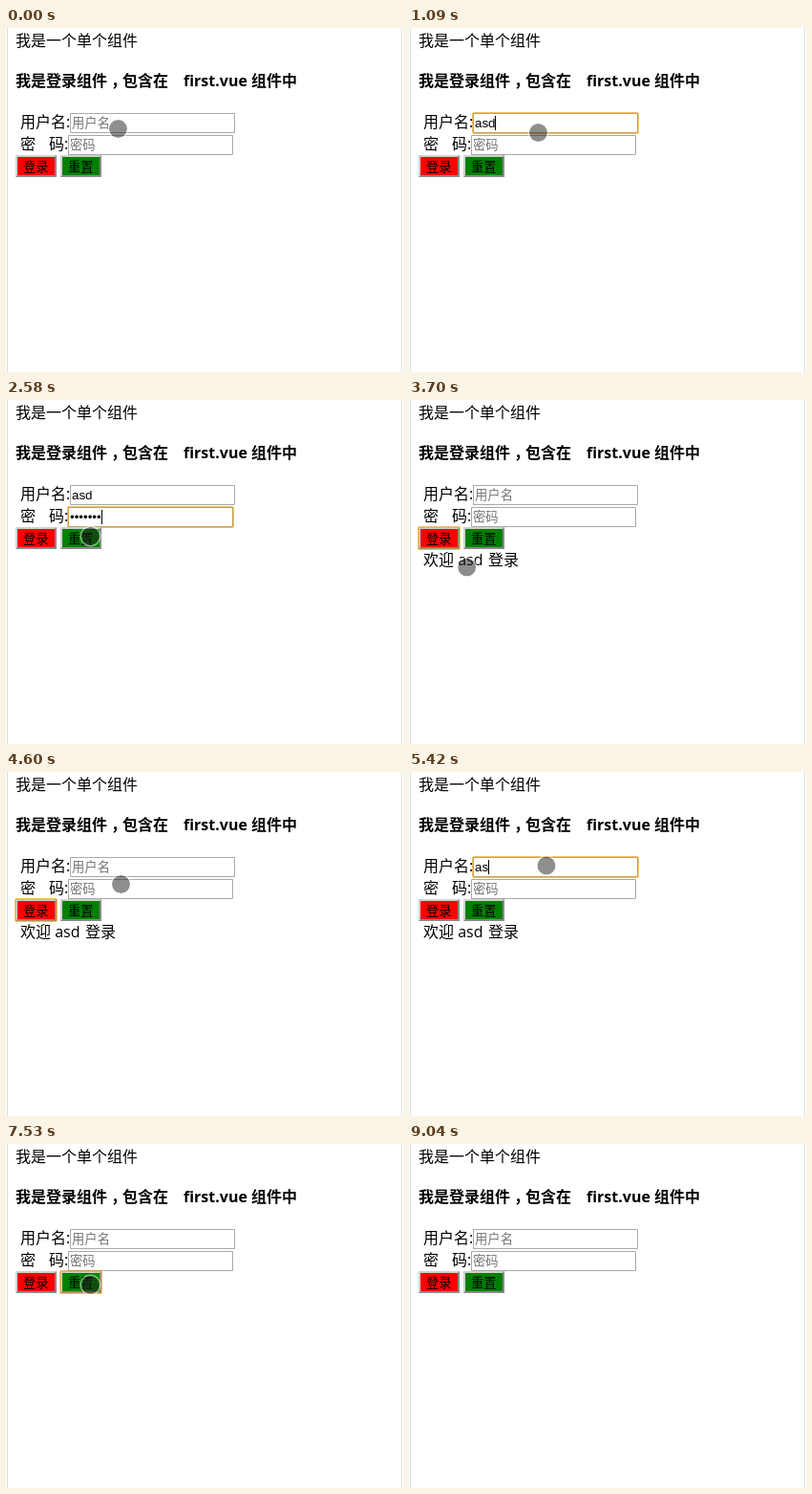
These frames come from a looping animation (416x360 px, 9.14 s). An HTML page with a canvas:

```html
<!DOCTYPE html>
<html lang="zh-CN">
<head>
<meta charset="utf-8">
<title>登录组件</title>
<style>
html, body { margin: 0; width: 100%; height: 100%; overflow: hidden; background: #fff; }
canvas { display: block; }
</style>
</head>
<body>
<canvas id="stage" width="416" height="360"></canvas>
<script>
const ctx = document.getElementById('stage').getContext('2d');
const LOOP = 9140;
const LOGIN = 3290, RESET = 7530, BLUR = 9040, POINTER_GONE = 8200;

const CJK = '"Noto Sans CJK SC", "Noto Sans CJK JP", sans-serif';
const BODY = '16px "Open Sans", ' + CJK;
const BOLD = 'bold ' + BODY;
const FIELD = '13.33px "Liberation Sans", ' + CJK;

// Pointer moves: start, end and the place reached.
const moves = [
  { from: 850, to: 1090, x: 135.5, y: 109.5 },
  { from: 1090, to: 1400, x: 131.5, y: 120 },
  { from: 2310, to: 2580, x: 88.5, y: 142.5 },
  { from: 2580, to: 2850, x: 38, y: 150 },
  { from: 3420, to: 3810, x: 66, y: 181 },
  { from: 3810, to: 4330, x: 114, y: 169 },
  { from: 4330, to: 4600, x: 120.5, y: 117.5 },
  { from: 4600, to: 4840, x: 144, y: 98 },
  { from: 5540, to: 5810, x: 124.5, y: 120.5 },
  { from: 6620, to: 6890, x: 88.5, y: 147.5 },
  { from: 7790, to: 8060, x: 88.5, y: 265 }
];

const clamp = (v, lo, hi) => Math.min(hi, Math.max(lo, v));
const ease = p => p * p * (3 - 2 * p);

function pointerAt(t) {
  let x = 117.5, y = 105.5;
  for (const m of moves) {
    const p = ease(clamp((t - m.from) / (m.to - m.from), 0, 1));
    x += (m.x - x) * p;
    y += (m.y - y) * p;
  }
  return [x, y];
}

function typed(word, t, start, step) {
  return word.slice(0, clamp(Math.floor((t - start) / step) + 1, 0, word.length));
}

function focusAt(t) {
  if (t >= BLUR) return '';
  if (t >= RESET) return 'reset';
  if (t >= 6090) return 'pass';
  if (t >= 4990) return 'user';
  if (t >= LOGIN) return 'login';
  if (t >= 1630) return 'pass';
  return t >= 400 ? 'user' : '';
}

function formAt(t) {
  const form = { user: '', pass: '', focus: focusAt(t), welcome: t >= LOGIN && t < RESET };
  if (t < LOGIN) {
    form.user = typed('asd', t, 670, 150);
    form.pass = typed('•'.repeat(7), t, 1910, 88);
  } else if (t < RESET) {
    form.user = typed('asdf', t, 5140, 180);
    form.pass = typed('•'.repeat(4), t, 6490, 90);
  }
  form.caret = t < 7160;
  return form;
}

function text(str, x, y, font = BODY, color = '#000') {
  ctx.font = font;
  ctx.fillStyle = color;
  ctx.fillText(str, x, y);
}

function rect(x, y, w, h, color) {
  ctx.fillStyle = color;
  ctx.fillRect(x, y, w, h);
}

function frame(x, y, w, h, color, radius = 0) {
  ctx.lineWidth = 1;
  ctx.strokeStyle = color;
  ctx.beginPath();
  ctx.roundRect(x + 0.5, y + 0.5, w - 1, h - 1, radius);
  ctx.stroke();
}

function glow(x, y, w, h) {
  frame(x - 1, y - 1, w + 2, h + 2, 'rgba(229,151,0,.6)', 1.5);
  frame(x, y, w, h, 'rgba(229,151,0,.45)');
}

function field(x, y, value, hint, focused, caret) {
  const w = 173, h = 21;
  frame(x, y, w, h, '#a9a9a9');
  if (focused) glow(x, y, w, h);
  text(value || hint, x + 2, y + 15, FIELD, value ? '#000' : '#757575');
  if (focused && caret) {
    rect(Math.round(x + 2 + ctx.measureText(value).width), y + 3, 1, 15, '#000');
  }
}

function button(x, label, color, focused) {
  const y = 133, w = 43, h = 23;
  rect(x, y, w, h, '#898989');
  ctx.fillStyle = '#d0d0d0';
  ctx.beginPath();
  ctx.moveTo(x, y);
  ctx.lineTo(x + w, y);
  ctx.lineTo(x + w - 2, y + 2);
  ctx.lineTo(x + 2, y + h - 2);
  ctx.lineTo(x, y + h);
  ctx.fill();
  rect(x + 2, y + 2, w - 4, h - 4, color);
  if (focused) glow(x, y, w, h);
  text(label, x + 8, y + 17, FIELD);
}

function circle(x, y, r) {
  ctx.beginPath();
  ctx.arc(x, y, r, 0, Math.PI * 2);
}

function pointer(x, y) {
  ctx.fillStyle = 'rgba(30,30,30,.5)';
  circle(x, y, 9.5);
  ctx.fill();
  ctx.lineWidth = 1.4;
  ctx.strokeStyle = 'rgba(255,255,255,.5)';
  circle(x, y, 10.2);
  ctx.stroke();
}

function draw(t) {
  const form = formAt(t);
  rect(0, 0, 416, 360, '#fff');
  rect(1, 0, 1, 360, '#dedede');
  rect(414, 0, 1, 360, '#dedede');

  text('我是一个单个组件', 10, 19);
  text('我是登录组件', 10, 61, BOLD);
  text('，', 110, 61, BOLD);
  text('包含在', 122, 61, BOLD);
  text('first.vue', 186, 61, BOLD);
  text('组件中', 257, 61, BOLD);

  text('用户名:', 15, 104);
  field(67, 89, form.user, '用户名', form.focus === 'user', form.caret);
  text('密', 15, 127);
  text('码:', 45, 127);
  field(65, 112, form.pass, '密码', form.focus === 'pass', form.caret);

  button(10, '登录', '#f00', form.focus === 'login');
  button(57, '重置', '#008000', form.focus === 'reset');

  if (form.welcome) {
    text('欢迎 asd', 15, 173);
    text('登录', 83, 173);
  }
  if (t < POINTER_GONE) pointer(...pointerAt(t));
}

const start = performance.now();
function tick() {
  draw((performance.now() - start) % LOOP);
  requestAnimationFrame(tick);
}
tick();
</script>
</body>
</html>
```
